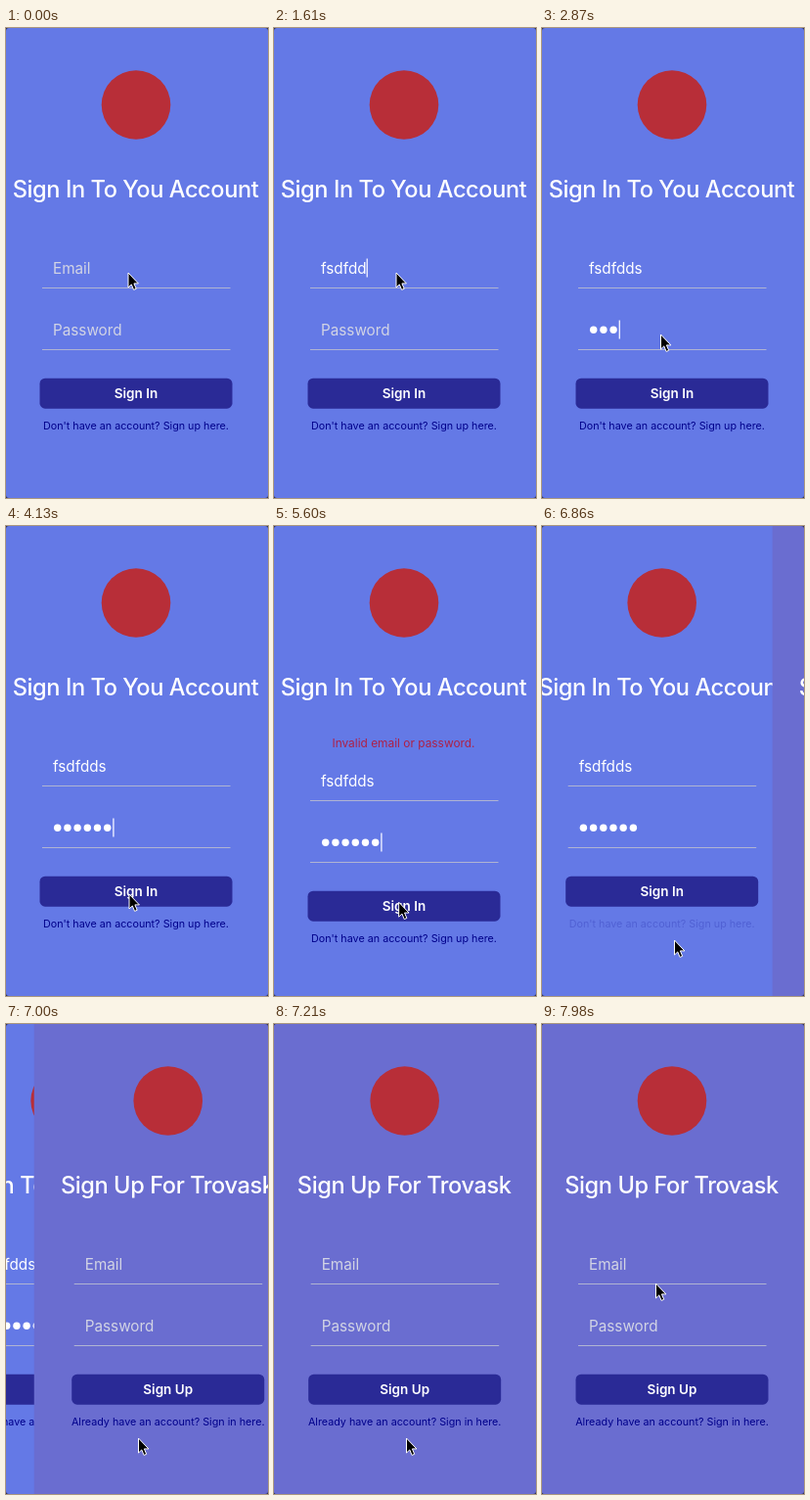
Recreate the animation shown at these times as an HTML page. Size 268x480 px, loop 8 s.

```html
<!DOCTYPE html>
<html lang="en">
<head>
<meta charset="utf-8">
<title>Sign in</title>
<style>
  html, body { margin: 0; width: 100%; height: 100%; overflow: hidden; background: #2b2f4a; }
  svg { display: block; width: 268px; height: 480px; border-radius: 3px; }
  text { font: 15.25px Inter, sans-serif; fill: #fff; }
  .title, .button, .link, .error { text-anchor: middle; }
  .title { font-size: 23.6px; font-weight: 500; letter-spacing: -.42px; }
  .hint { fill: #d2d4e4; }
  .button { font-size: 13.5px; font-weight: 600; }
  .link { font-size: 10.75px; fill: #00008b; }
  .error { font-size: 11.9px; fill: #ad2148; }
</style>
</head>
<body>
<svg id="stage" viewBox="0 0 268 480"></svg>
<script>
const LOOP = 8000, STEP = 70, WIDTH = 274;

const screen = (id, color, title, action, link) => `
  <g id="${id}">
    <rect x="-4" width="${WIDTH}" height="480" fill="${color}"/>
    <circle cx="133" cy="78.5" r="35.3" fill="#b82e38"/>
    <text class="title" x="132.5" y="172.5">${title}</text>
    <text class="error" x="132.5" y="226" visibility="hidden">Invalid email or password.</text>
    <g class="form">
      <path d="M37 265.5H229.5M37 328.5H229.5" stroke="#b0b4d2"/>
      <text class="hint email" x="48" y="251">Email</text>
      <text class="hint password" x="48" y="314">Password</text>
      <text class="typed" x="48" y="251"></text>
      <g class="dots" fill="#fff"></g>
      <g class="submit">
        <rect x="34.5" y="357.7" width="197" height="31" rx="5.5" fill="#2a2a96"/>
        <text class="button" x="133" y="378">${action}</text>
      </g>
      <text class="link" x="133" y="410">${link}</text>
      <rect class="caret" width="1.4" height="19" fill="#e9ebff" visibility="hidden"/>
    </g>
  </g>`;

const stage = document.getElementById('stage');
stage.innerHTML =
  screen('signin', '#6479e6', 'Sign In To You Account', 'Sign In', "Don't have an account? Sign up here.") +
  screen('signup', '#6a6dd0', 'Sign Up For Trovask', 'Sign Up', 'Already have an account? Sign in here.') +
  `<path id="pointer" d="M0 1V16L3.3 12.9L5.6 18.4L8.2 17.3L5.9 11.9H10.4Z"
     fill="#000" stroke="#fff" stroke-linejoin="round"/>`;

const find = selector => stage.querySelector(selector);
const move = (el, x, y = 0) => el.setAttribute('transform', `translate(${x} ${y})`);
const show = (el, on) => el.setAttribute('visibility', on ? 'visible' : 'hidden');
const clamp = u => Math.min(1, Math.max(0, u));
const linear = u => u;
const easeOut = u => 1 - (1 - u) ** 2;

// Value of a [time, value] track at time t
function track(t, keys, ease = linear) {
  const next = keys.findIndex(k => k[0] > t);
  if (next === 0) return keys[0][1];
  if (next < 0) return keys[keys.length - 1][1];
  const [t0, a] = keys[next - 1], [t1, b] = keys[next];
  return a + (b - a) * ease((t - t0) / (t1 - t0));
}

// Cubic bezier (.2833, .99, .3183, .99), solved by bisection
function slide(u) {
  const curve = (s, a, b) => 3 * (1 - s) ** 2 * s * a + 3 * (1 - s) * s * s * b + s ** 3;
  let lo = 0, hi = 1;
  for (let i = 0; i < 24; i++) {
    const mid = (lo + hi) / 2;
    if (curve(mid, .2833, .3183) < u) lo = mid; else hi = mid;
  }
  return curve(lo, .99, .99);
}

const emailKeys = [980, 1260, 1260, 1400, 1470, 1610, 1680];
const passwordKeys = [2660, 2800, 2870, 3080, 3080, 3080];
const pointerX = [[1680, 125], [2240, 121.5], [3220, 121.5], [3710, 126], [5530, 126], [6300, 135.5], [7770, 135.5], [7980, 116.5]];
const pointerY = [[1680, 249], [2240, 312], [3220, 312], [3710, 375], [5530, 375], [6300, 422], [7770, 422], [7980, 264]];
const pressSubmit = [[3780, 1], [3920, .3], [3990, .3], [4130, 1]];
const pressLink = [[6440, 1], [6580, .2], [6860, .2], [7000, 1]];
const blink = [[0, 1], [190, 0], [260, 0], [490, 1], [1000, 1]];

const signin = find('#signin'), signup = find('#signup');
const typed = find('.typed'), dots = find('.dots'), caret = find('.caret');

function draw(t) {
  const letters = emailKeys.filter(k => k <= t).length;
  const count = passwordKeys.filter(k => k <= t).length;
  typed.textContent = 'fsdfdds'.slice(0, letters);
  show(find('.email'), !letters);
  show(find('.password'), !count);
  dots.innerHTML = Array.from({ length: count }, (_, i) =>
    `<circle cx="${52.7 + 10.2 * i}" cy="308.3" r="3.7"/>`).join('');

  const inPassword = t >= 2310;
  const width = letters ? typed.getComputedTextLength() : 0;
  caret.setAttribute('x', inPassword ? 48 + 10.2 * count : 48 + width);
  caret.setAttribute('y', inPassword ? 298.5 : 235.5);
  caret.setAttribute('opacity', t > 3500 && t < 6300 ? track((t - 3640) % 1000, blink) : 1);
  show(caret, t >= 490 && t < 6790);

  const failed = t >= 4970 && t < 6790;
  show(find('.error'), failed);
  move(find('.form'), 0, failed ? 15 : 0);
  find('.submit').setAttribute('opacity', track(t, pressSubmit));
  find('.link').setAttribute('opacity', track(t, pressLink));

  const p = slide(clamp((t - 6844.6) / 426));
  move(signin, -.3 * WIDTH * p);
  move(signup, WIDTH * (1 - p));
  move(find('#pointer'), track(t, pointerX, easeOut), track(t, pointerY, easeOut));
}

const start = performance.now();
function frame() {
  const t = (performance.now() - start) % LOOP;
  draw(Math.floor(t / STEP) * STEP);
  requestAnimationFrame(frame);
}
frame();
</script>
</body>
</html>
```
